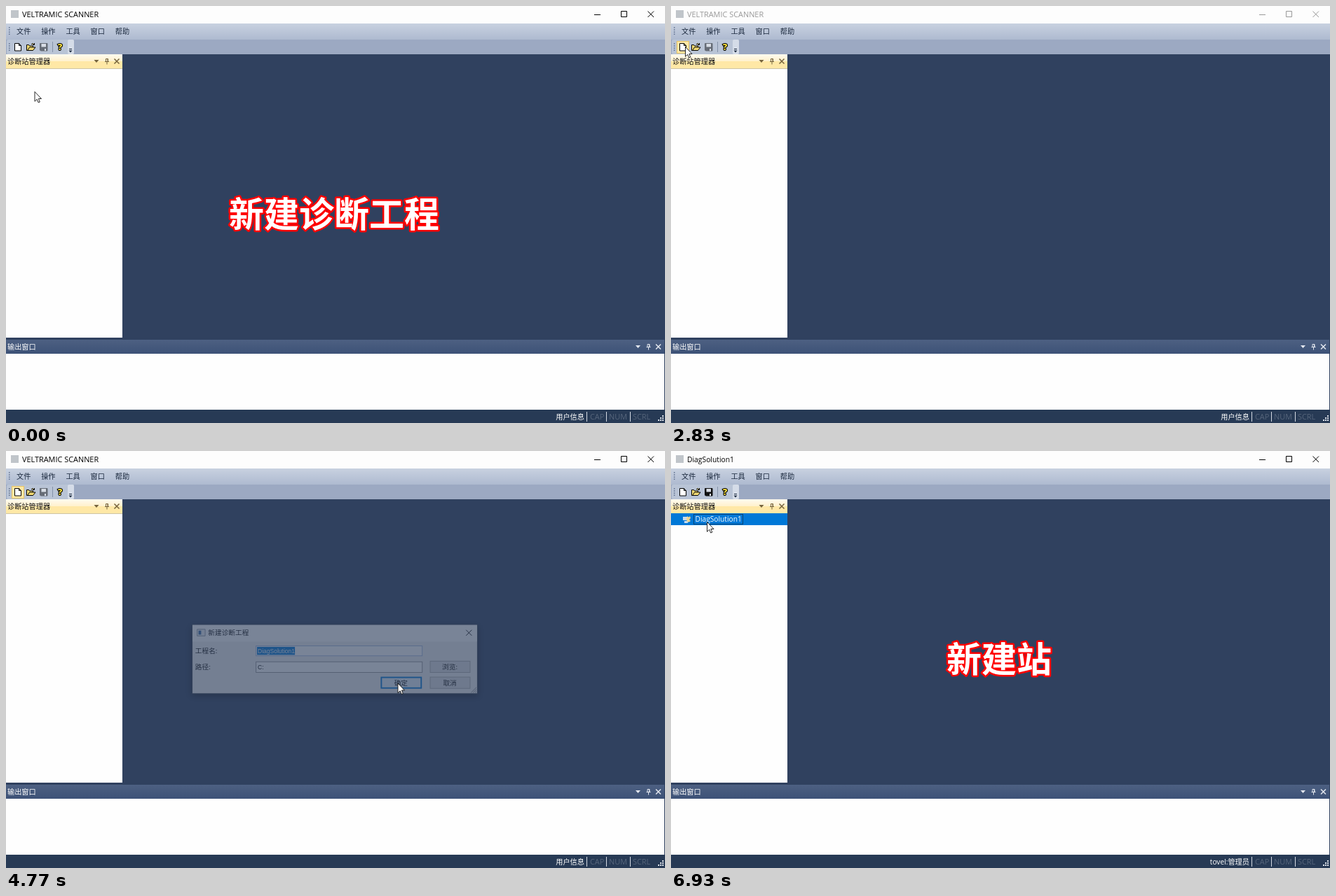
These frames come from a looping animation (940 px wide and 596 px high, 8000 ms). An HTML page:

```html
<!DOCTYPE html>
<html lang="zh-CN">
<head>
<meta charset="utf-8">
<title>新建诊断工程</title>
<style>
html, body { margin: 0; width: 100%; height: 100%; overflow: hidden; background: #30415f; }
svg { display: block; }
text { font: 10.2px "Open Sans", "Noto Sans CJK SC", "Noto Sans CJK", sans-serif; fill: #111; white-space: pre; }
.light text, text.light { fill: #fff; }
.keys text { font-size: 10.9px; fill: #56657b; }
.field { font: 9px "Liberation Sans", Arial, sans-serif; }
.mid { text-anchor: middle; }
.end { text-anchor: end; }
.line { fill: none; stroke: currentColor; }
#caption { font: 700 50px "Noto Sans CJK SC", "Noto Sans CJK", sans-serif; fill: #fff; stroke: #f00; stroke-width: 5; stroke-linejoin: round; paint-order: stroke; }
</style>
</head>
<body>
<svg width="940" height="596" viewBox="0 0 940 596">
  <defs>
    <linearGradient id="menuFill" x2="0" y2="1"><stop stop-color="#c8d1e0"/><stop offset="1" stop-color="#aebad0"/></linearGradient>
    <linearGradient id="paneFill" x2="0" y2="1"><stop stop-color="#fffbf0"/><stop offset=".5" stop-color="#fff1cc"/><stop offset=".5" stop-color="#ffe8a6"/><stop offset="1" stop-color="#ffe8a6"/></linearGradient>
    <linearGradient id="outFill" x2="0" y2="1"><stop stop-color="#4d6082"/><stop offset="1" stop-color="#3d5277"/></linearGradient>
    <filter id="shadow" x="-10%" y="-30%" width="120%" height="170%"><feGaussianBlur stdDeviation="5"/></filter>
    <g id="tools">
      <path d="M-18.500 -2h7l-3.500 4z" fill="currentColor"/>
      <path class="line" d="M-1.500 -3.500h3v4h-3zM-3 .5h6M0 .5v4M1 -3v3"/>
      <path class="line" d="M10.500 -3.500l7 7m0 -7l-7 7" stroke-width="1.500"/>
    </g>
    <g id="grip" fill="#5e6e8c"><path d="M0 0h1.500v1.500H0zm0 3.200h1.500v1.500H0zm0 3.200h1.500v1.500H0zm0 3.200h1.500v1.500H0z"/></g>
  </defs>

  <!-- title bar -->
  <rect width="940" height="25" fill="#fdfdfd"/>
  <rect x="7" y="6" width="11" height="11" fill="#c0c5ca"/>
  <g id="titleBar" color="#000">
    <text id="title" x="23" y="16" style="fill:currentColor"></text>
    <path class="line" d="M839 12.500h9M877.500 7.500h8v8h-8zM915.500 7.500l8.500 8.500m0 -8.500l-8.500 8.500"/>
  </g>

  <!-- menu and toolbar -->
  <rect y="25" width="940" height="23" fill="url(#menuFill)"/>
  <rect y="48" width="940" height="21" fill="#9ca9c2"/>
  <rect x="1" y="48" width="96" height="21" rx="2" fill="#b9c4d6"/>
  <rect x="88" y="48" width="9" height="21" rx="2" fill="#d5dce8"/>
  <use href="#grip" x="4" y="30"/>
  <use href="#grip" x="4" y="53"/>
  <g id="menu"></g>
  <rect id="newButton" x="8.500" y="50.500" width="17" height="17" stroke="#e5c365"/>
  <path d="M12.500 53.500h6l3 3v7.500h-9zM18.500 53.500v3h3" fill="#fff" stroke="#000"/>
  <path d="M29.500 63.500v-8h3l1 1.500h5v2h3.500l-3.500 4.500zM31 63l2.500 -4h5M36 55q2 -3 4 0m.500 -2v2.500h-2.500" fill="#f4dc75" stroke="#000"/>
  <g id="save" color="#666c76">
    <path d="M48.500 53.500h10.500v10.500h-9.500l-1 -1z" fill="currentColor" stroke="currentColor"/>
    <path d="M50.500 54h6.500v4.500h-6.500zM55 61h2v3h-2z" fill="#d8dde5"/>
  </g>
  <path class="line" d="M66.500 51v15" color="#8592a9"/>
  <text class="mid" x="77" y="63" style="font-size:13px;font-weight:800;fill:#f4dc3c;stroke:#000;stroke-width:2;paint-order:stroke">?</text>
  <path d="M89.500 63.500h5l-2.500 3zM90 61h4v1h-4z" fill="#1b293e"/>

  <!-- side pane -->
  <rect y="69" width="166" height="405" fill="#fefefe"/>
  <rect y="69" width="166" height="20" fill="url(#paneFill)"/>
  <path class="line" d="M0 89.500h166" color="#cfc5a5"/>
  <text x="2" y="83">诊断站管理器</text>
  <use href="#tools" x="144" y="79" color="#75633d"/>
  <g id="tree" class="light">
    <rect y="89" width="166" height="17" fill="#0078d7"/>
    <path d="M17 94h8v5h-8zM19 100h5v3h-5z" fill="#c9dceb"/>
    <path d="M23 93l2 2 2 -2 1 3 -2 2 2 2 -3 2 -3 -3z" fill="#f2d58c"/>
    <text x="34.500" y="101">DiagSolution1</text>
    <rect class="line" x="32.500" y="90.500" width="70" height="14" color="#111" stroke-dasharray="1 1"/>
  </g>

  <!-- output pane and status bar -->
  <rect y="477" width="939" height="20" fill="url(#outFill)"/>
  <text class="light" x="2" y="491">输出窗口</text>
  <use href="#tools" x="917" y="487" color="#e4e8ef" transform="translate(-.5 0)"/>
  <rect y="497" width="939" height="80" fill="#fefefe"/>
  <rect y="577" width="940" height="19" fill="#273a55"/>
  <text id="hint" class="light" x="1" y="591">新建诊断工程</text>
  <text id="user" class="light end" x="825" y="591"></text>
  <path class="line" d="M828.500 580v14M856.500 580v14M890.500 580v14" color="#d5dae3"/>
  <g class="keys"><text x="833" y="591">CAP</text><text x="860" y="591">NUM</text><text x="894" y="591">SCRL</text></g>
  <path d="M936 585h2v2h-2zm0 3h2v2h-2zm0 3h2v2h-2zM933 588h2v2h-2zm0 3h2v2h-2zM930 591h2v2h-2z" fill="#dfe4ec"/>

  <g id="dialog">
    <rect x="254" y="249" width="430" height="104" fill="#000" opacity=".5" filter="url(#shadow)"/>
    <rect x="254.500" y="245.500" width="429" height="104" fill="#f0f0f0" stroke="#35404f"/>
    <rect x="255" y="246" width="428" height="25" fill="#fff"/>
    <path d="M262 252.500h12v10h-12z" fill="#eef1f4" stroke="#8d979f"/>
    <path d="M264 254.500h4v6h-4z" fill="#3c6ea5"/>
    <path class="line" d="M666.500 253.500l8.500 8.500m0 -8.500l-8.500 8.500" color="#111"/>
    <text x="278.500" y="261.500">新建诊断工程</text>
    <text x="259" y="289">工程名:</text>
    <text x="259" y="313">路径:</text>
    <rect x="350.500" y="277.500" width="250" height="15" fill="#fff" stroke="#a3b9dd"/>
    <rect x="350.500" y="301.500" width="250" height="16" fill="#fff" stroke="#949494"/>
    <rect x="352" y="279" width="57" height="12" fill="#0078d7"/>
    <text class="field light" x="353" y="288.500">DiagSolution1</text>
    <rect id="caret" x="408" y="279" width="1" height="13" fill="#000"/>
    <text class="field" x="353" y="313">C:</text>
    <g fill="#e1e1e1" stroke="#adadad">
      <rect x="612.500" y="300.500" width="60" height="17"/>
      <rect x="612.500" y="324.500" width="60" height="17"/>
      <rect id="ok" x="539" y="325" width="60" height="16" stroke="#0078d7" stroke-width="2"/>
    </g>
    <text class="mid" x="642" y="313">浏览:</text>
    <text class="mid" x="642" y="337">取消</text>
    <text class="mid" x="568.500" y="337">确定</text>
    <path class="line" d="M674 348l8 -8M677 348l5 -5M680 348l2 -2" color="#8c8c8c"/>
  </g>

  <g id="tip">
    <rect x="19.500" y="73.500" width="65" height="17" fill="#fff" stroke="#767676"/>
    <text x="21.500" y="86" style="fill:#575757">新建诊断工程</text>
  </g>
  <text id="caption" y="315.500"></text>
  <path id="cursor" d="M.5 .5V14.300L3.700 11.300 5.700 16 7.800 15.100 5.900 10.500H10z" fill="#fff" stroke="#111" stroke-width=".9"/>
</svg>
<script>
const $ = id => document.getElementById(id);
const set = (id, name, value) => $(id).setAttribute(name, value);
const show = (id, on) => set(id, 'opacity', Number(on));
const write = (id, text) => { if ($(id).textContent !== text) $(id).textContent = text; };
const within = (t, a, b) => t >= a && t < b;

// Number of the step reached: n even steps, the first at a, the last at b.
const step = (t, a, b, n) =>
  t < a ? 0 : Math.min(n, 1 + Math.floor((t - a + 5) * (n - 1) / (b - a)));
const smooth = p => p * p * (3 - 2 * p);

['文件', '操作', '工具', '窗口', '帮助'].forEach((name, i) => {
  $('menu').innerHTML += `<text x="${15 + 35.2 * i}" y="40" style="fill:#1b293e">${name}</text>`;
});

// start, end, steps, x, y
const moves = [
  [500, 1130, 9, 20, 58],
  [3300, 4080, 11, 535, 331],
  [4160, 4380, 4, 558.5, 331.5],
  [5150, 5460, 5, 67, 143],
  [5620, 6000, 6, 51, 101]
];

function cursorAt(t) {
  let x = 40.5, y = 122;
  for (const [a, b, n, toX, toY] of moves) {
    const p = smooth(step(t, a, b, n) / n);
    x += (toX - x) * p;
    y += (toY - y) * p;
  }
  return [x, y];
}

function drawDialog(t, x) {
  const opening = Math.max(0, step(t, 2760, 3070, 5) - 1) / 4;
  const closing = Math.max(0, step(t, 4630, 4920, 5) - 1) / 4;
  const alpha = (1 - (1 - opening) ** 2) * (1 - closing) ** 1.5;
  const scale = 0.92 + 0.08 * alpha;
  show('dialog', alpha);
  set('dialog', 'transform', `translate(469 297.5) scale(${scale}) translate(-469 -297.5)`);
  show('caret', within(t, 3070, 3700) || within(t, 4230, 4760));
  set('ok', 'fill', within(t, 4630, 4700) ? '#cce4f7' : x > 538 ? '#e5f1fb' : '#e1e1e1');
}

function draw() {
  const t = performance.now() % 8000;
  const [x, y] = cursorAt(t);
  const loaded = t >= 6390;
  set('cursor', 'transform', `translate(${x} ${y})`);
  drawDialog(t, x);

  write('title', loaded ? 'DiagSolution1' : 'VELTRAMIC SCANNER');
  $('title').style.fontSize = loaded ? '10.3px' : '10.9px';
  set('titleBar', 'color', within(t, 2760, 4700) ? '#999' : '#000');
  set('save', 'color', loaded ? '#111' : '#666c76');
  show('tree', loaded);
  write('user', t >= 6455 ? 'tovel:管理员' : '用户信息');

  show('newButton', within(t, 1045, 6390));
  set('newButton', 'fill', t < 2600 ? '#fff8e3' : '#ffe8a6');
  show('hint', within(t, 1045, 2760));
  show('tip', within(t, 1760, 2600) ? step(t, 1760, 1840, 2) / 2 : 0);

  write('caption', t < 500 ? '新建诊断工程' : t >= 6930 ? '新建站' : '');
  set('caption', 'x', t < 500 ? 318 : 393);
  requestAnimationFrame(draw);
}
draw();
</script>
</body>
</html>
```
